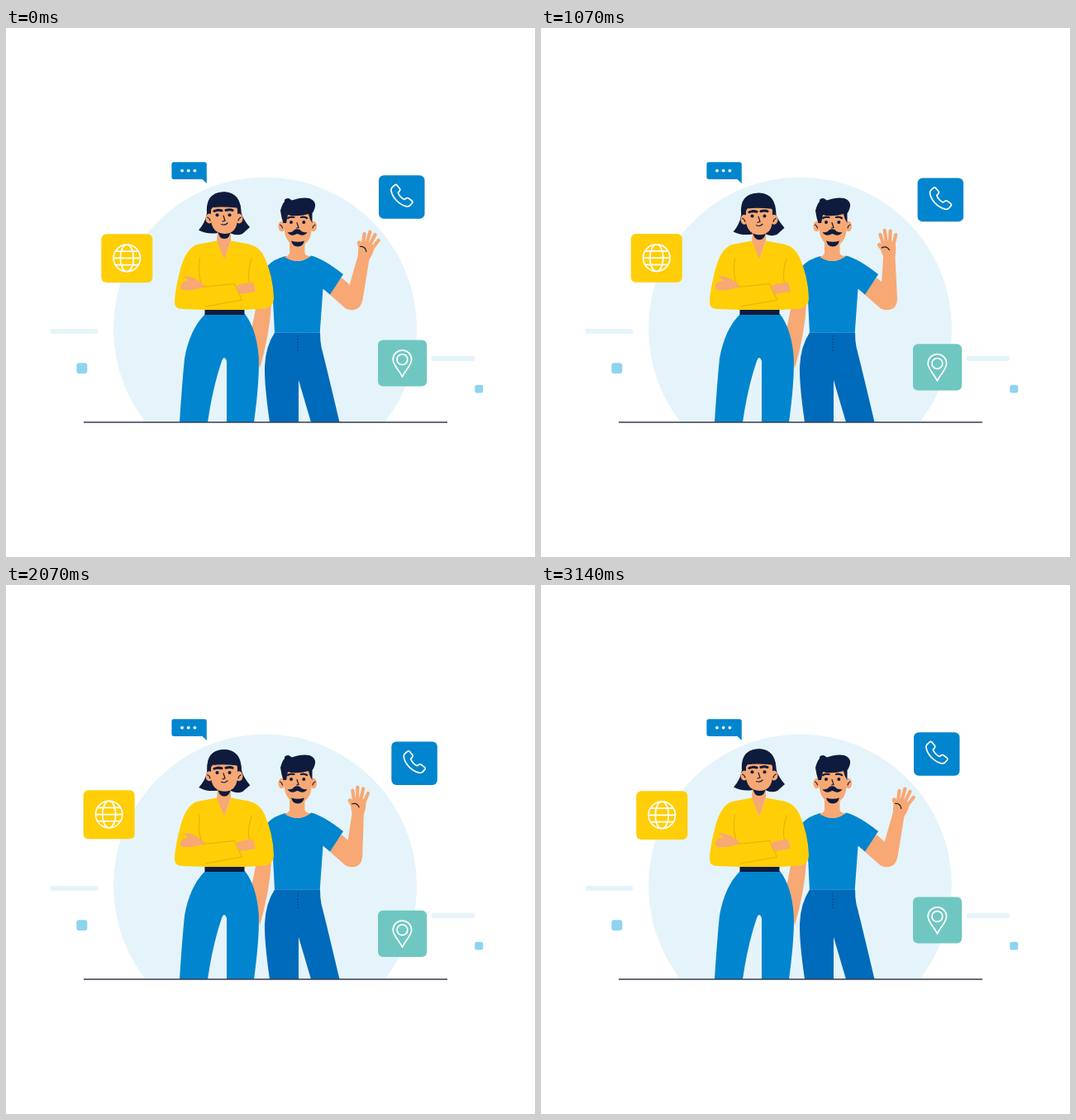
Write an HTML page that moves like this. It is 640 px wide and 640 px high and loops after 3210 ms.

```html
<!DOCTYPE html>
<html lang="en">
<head>
<meta charset="utf-8">
<title>Contact us</title>
<style>
html, body { margin: 0; height: 100%; overflow: hidden; background: #fff; }
svg { display: block; width: 100vw; height: 100vh; }
.blue { fill: #0085ce; }
.deep { fill: #006bba; }
.yellow { fill: #ffce07; }
.skin { fill: #f7a874; }
.navy { fill: #0f1b3c; }
.teal { fill: #70c7c1; }
.pale { fill: #e5f4fa; }
.sky { fill: #8ed4ef; }
.icon { fill: none; stroke: #fff; stroke-width: 1.7; stroke-linejoin: round; }
.ink { fill: none; stroke: #0f1b3c; stroke-width: 1.2; stroke-linecap: round; }
.brow { stroke-width: 3; }
.fold { fill: none; stroke: #e8b500; stroke-width: 1.2; }
.finger { fill: none; stroke: #f7a874; stroke-width: 5; stroke-linecap: round; }
</style>
</head>
<body>
<svg viewBox="0 0 640 640">
  <!-- backdrop -->
  <clipPath id="floor"><path d="M0 0H640V477H0Z"/></clipPath>
  <circle class="pale" cx="313.5" cy="364" r="183.5" clip-path="url(#floor)"/>
  <rect class="pale" x="53.5" y="364" width="58" height="6" rx="3"/>
  <rect class="pale" x="514.5" y="397" width="53" height="6" rx="3"/>
  <rect class="sky" x="85.3" y="405.3" width="13" height="12.8" rx="3"/>
  <rect class="sky" x="567.2" y="431.8" width="10" height="9.6" rx="2.5"/>
  <path class="blue" d="M203 162.3H240Q242.8 162.3 242.8 165V188L237.5 183H203Q200.4 183 200.4 180V165Q200.4 162.3 203 162.3Z"/>
  <g fill="#fff"><circle cx="213" cy="172.6" r="1.9"/><circle cx="220.7" cy="172.6" r="1.9"/><circle cx="228.4" cy="172.6" r="1.9"/></g>

  <!-- cards -->
  <g id="globe">
    <rect class="yellow" x="115.3" y="249.2" width="62" height="58.8" rx="6"/>
    <g class="icon"><circle cx="146.3" cy="278.4" r="16.2"/><ellipse cx="146.3" cy="278.4" rx="8" ry="16.2"/><path d="M130 278.4H162.6M132.5 270.2H160.1M132.5 286.6H160.1"/></g>
  </g>
  <g id="phone">
    <rect class="blue" x="451" y="178.2" width="55.5" height="52.6" rx="6"/>
    <path class="icon" d="M467 193L470.5 189.8Q471.8 189 473 190.2L476.5 194.5Q477.3 196 476 197.3L474.3 199Q476 204.5 482 207.5L484.2 206Q485.6 205 487 206L491 209Q492.6 210.3 491.4 211.8L488.5 215Q487 216.3 484.5 215.8C475 213.5 467.5 205 466 197Q465.7 194.5 467 193Z"/>
  </g>
  <g id="pin">
    <rect class="teal" x="450" y="377.4" width="59.2" height="56.2" rx="6"/>
    <g class="icon"><path d="M479.4 422C476 414 468.2 408 468.2 401A11.2 11.2 0 0 1 490.6 401C490.6 408 483 414 479.4 422Z"/><circle cx="479.4" cy="401" r="6.4"/></g>
  </g>

  <!-- man -->
  <path class="skin" d="M303 335H321Q319 370 307 412L297 365Z"/>
  <path class="skin" d="M390 321L406 302L414 309L430 329Q425 346 411 339.5Z"/>
  <g id="forearm">
    <path class="skin" d="M411.5 315L414 274H428L431 327Q431 341 419 341Q410 340 406 334Z"/>
    <g id="hand">
      <path class="skin" d="M411 262Q413 257 419 257.500L427.500 258Q430 266 428 277H414Q410 270 411 262Z"/>
      <path class="finger" d="M415 270L408.800 262.500"/>
      <path class="finger" style="stroke-width:4.200" d="M414 263L409.800 250M417.500 260L415 245M421.500 260L422 245.500M426 262L428.700 250"/>
      <path class="ink" d="M412 266Q417.500 263 421 268.500"/>
    </g>
  </g>
  <path class="blue" d="M316 288Q325 279 338 276Q353 288 369 275.500Q384 279 408 298L392 322.500L383.500 315.500L379.700 369H325L322 310Z"/>
  <path class="deep" d="M325 368.500H380Q380 378 381.500 386Q387 407 403.500 477H369L354 426V477H319Q312.500 432 313 410Q314 385 325 368.500Z"/>
  <path d="M325 368.500H380" stroke="#3f96d2" stroke-width=".7"/>
  <path d="M353 372V392" stroke="#0f1b3c" stroke-width=".7" stroke-dasharray="1.500 2"/>
  <path class="skin" d="M343 255V273Q341 276 337 277Q353 287.500 369 276Q362 276 361.500 272V255Z"/>
  <g class="skin"><ellipse cx="333.500" cy="240" rx="4" ry="6.200"/><ellipse cx="372" cy="240" rx="4" ry="6.200"/></g>
  <path class="ink" d="M331.500 238Q334 239 334.500 242M374 238Q371.500 239 371 242"/>
  <path class="skin" d="M336.500 222H370V241Q369 263 353 264Q338 262 336.500 243Z"/>
  <path class="navy" d="M332 221Q334 213 337 210Q336 206 342 206L346 208.500Q358 204 367 206Q375 209 374 216Q372.500 222 370.500 224V236Q367 231 366 225Q351 229 341 226L339 236H335.500Q333 229 332 221Z"/>
  <path class="ink brow" style="stroke-width:2.200" d="M341 230Q344 228 348.500 229M357 229Q361 228 364 230"/>
  <circle class="navy" cx="345" cy="235" r="2"/><circle class="navy" cx="360.300" cy="235" r="2"/>
  <path class="ink" d="M352 235.500L354 241.500L351.500 242"/>
  <path class="navy" d="M340.500 247Q346 248 349 244Q352.500 242.500 355.500 244Q359 248 364.500 247Q361 252.500 355 250Q352.500 248 350 250Q344 252.500 340.500 247Z"/>
  <path class="navy" d="M345 257.500Q353 260 361 257.500Q359 264.500 353 264.500Q347 264.500 345 257.500Z"/>

  <!-- woman -->
  <path class="blue" d="M241 346H289Q303 364 305.700 398Q307 425 300 477H267V403Q264 395 261 403Q250 435 244 477H210Q213 430 216 400Q222 365 241 346Z"/>
  <g id="hair"><path class="navy" d="M243 224Q241 198.500 264 198.500Q284 199 284.500 223Q287 232 295 241L286 249Q279 252 271 248H256Q243 250 233 244.500Q241 236 243 224Z"/></g>
  <path class="skin" d="M256 244H272V258L264 281L255 259Z"/>
  <g id="head">
    <path class="navy" d="M256 245H272Q271 255 264 255Q257.500 255 256 245Z"/>
    <g class="skin"><ellipse cx="246" cy="230.500" rx="4.500" ry="6"/><ellipse cx="282" cy="230.500" rx="4.500" ry="6"/>
    <path d="M248 215H280V232Q279 249 264 249Q249 248 248 232Z"/></g>
    <path class="ink" d="M243.500 229Q246 229.500 247 233M284.500 229Q282 229.500 281 233"/>
    <path class="navy" d="M243.500 225Q242 198.500 264 198.200Q284.500 199 284.500 225Q281 222 279 217.500Q264 216 250 217Q247 222 243.500 225Z"/>
    <path class="ink brow" d="M252 221.500Q256 219.500 261 221M266 220.500Q271 219 274 220.500"/>
    <circle class="navy" cx="255.500" cy="226.200" r="2"/><circle class="navy" cx="270.500" cy="226.200" r="2"/>
    <path class="ink" d="M263 227L265 233L262 234M260.500 237.500Q265 239.500 268 236"/>
  </g>
  <path class="yellow" d="M255 257.500L231 262Q219 266 212 288Q204 318 204 332Q204 340 214 340L241 341H289L312 339.500Q323.500 338 324 327Q323 300 313 278Q308 265 294 261.500L272.500 257.500L264 280Z"/>
  <path class="fold" d="M234.500 278Q232 297 236 308M297 279Q291 300 295 309M237 313.500L276.500 309.500L285.500 329L241 337"/>
  <path class="skin" d="M211 311Q213 306.500 221 305.500L215.500 301.500Q216 299 221 300.500Q233 304 241 312L237 314Q224 318 214 317Q210 315 211 311Z"/>
  <path class="skin" d="M277.500 313L285 309.500L299 307.500L302 319L283 322Z"/>
  <rect class="navy" x="240.500" y="341" width="48" height="6"/>
  <path d="M94 477H534" stroke="#353d52" stroke-width="1.300"/>
</svg>
<script>
const LOOP = 3210, STEPS = 45, HALF = 22;
const el = id => document.getElementById(id);
const move = (id, value) => el(id).setAttribute('transform', value);
const shift = (id, x, y) => move(id, `translate(${x} ${y})`);

// Slow start, quick finish: cubic-bezier(1, 0, .8, 1)
function ease(x) {
  if (x <= 0) return 0;
  if (x >= 1) return 1;
  let lo = 0, hi = 1, s;
  for (let k = 0; k < 24; k++) {
    s = (lo + hi) / 2;
    const at = 3 * s * (1 - s) ** 2 + 2.4 * s * s * (1 - s) + s ** 3;
    if (at < x) lo = s; else hi = s;
  }
  return s * s * (3 - 2 * s);
}

function draw(time) {
  const step = Math.floor((time % LOOP + 4) / (LOOP / STEPS)) % STEPS;
  const u = step % HALF / HALF;
  const back = Math.floor(step / HALF) === 1;
  const drift = back ? 1 - ease(u) : ease(u);
  shift('globe', -22.6 * drift, -0.9 * drift);
  shift('phone', 16 * drift, 11.8 * drift);
  shift('pin', 0, 17 * drift);

  // one wave per half: swing left, rest, swing right
  const left = u < 0.57 ? ease(u / 0.382) : 1 - ease((u - 0.57) / 0.43);
  move('forearm', `rotate(${12.5 * (1 - left)} 421 330)`);
  move('hand', `rotate(${12.5 * (1 - left)} 421 276)`);
  const sway = back ? 1 : -1;
  shift('head', 0, 1.3 * left);
  move('hair', `translate(${0.8 * sway * left} ${1.3 * left}) rotate(${1.2 * sway * left} 264 225)`);
}

function tick() {
  draw(performance.now());
  requestAnimationFrame(tick);
}
tick();
</script>
</body>
</html>
```
